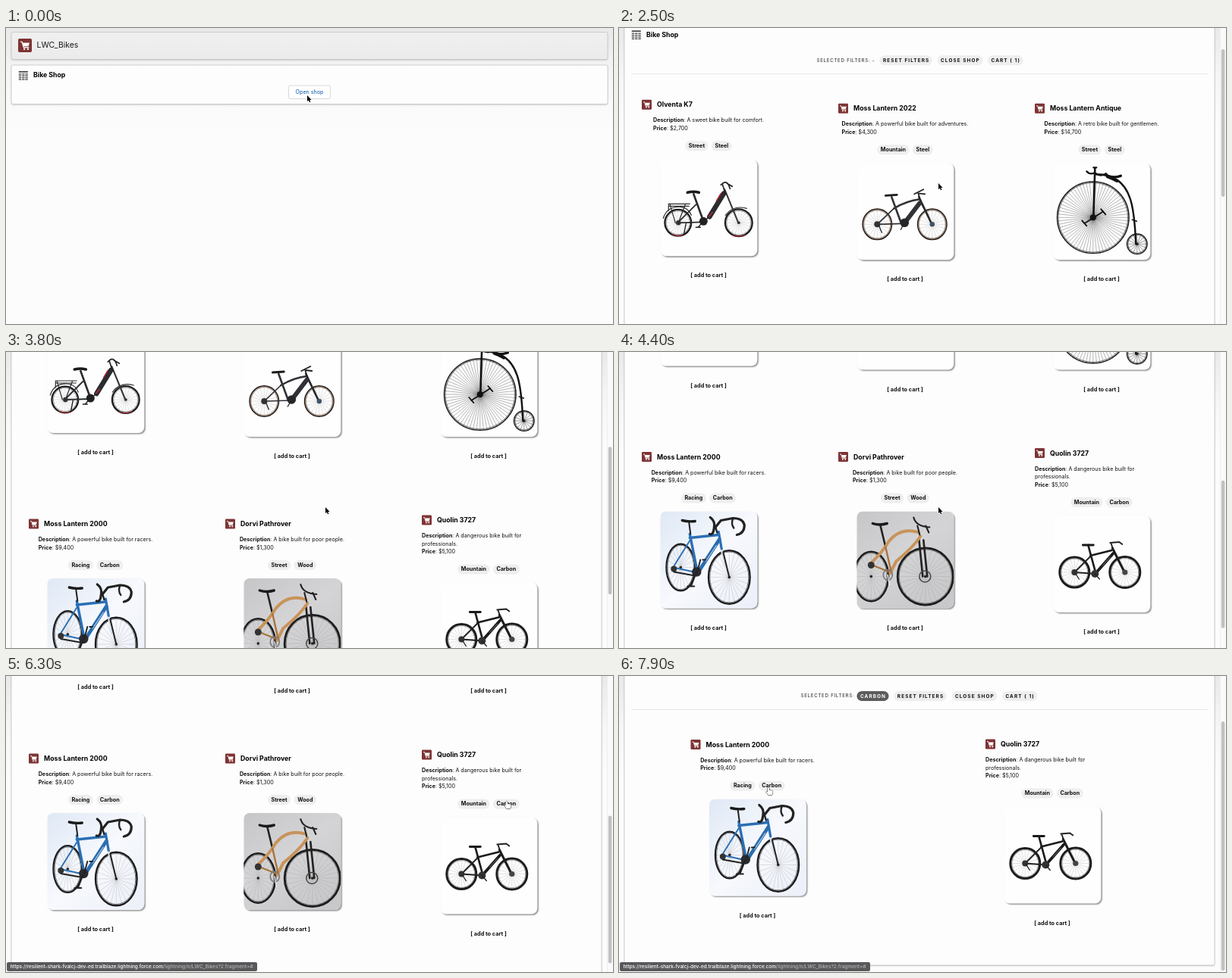
These frames come from a looping animation (800x391 px, 8000 ms). An HTML page with a canvas:

```html
<!DOCTYPE html>
<html lang="en">
<head>
<meta charset="utf-8">
<title>Bike Shop</title>
<style>
  html, body { margin: 0; width: 100%; height: 100%; overflow: hidden; background: #fcfcfc; }
  canvas { position: fixed; left: 0; top: 0; width: 800px; height: 391px; display: block; }
</style>
</head>
<body>
<canvas id="stage"></canvas>
<script>
const W = 800, H = 391, LOOP = 8000, STEP = 100;
const OPEN = 900, FILTER = 6600;
const FONT = 'Inter, "Liberation Sans", sans-serif';
const BODY = 7.15;
const dpr = window.devicePixelRatio || 1;
const canvas = document.getElementById('stage');
canvas.width = W * dpr;
canvas.height = H * dpr;
const c = canvas.getContext('2d');

// ---------- drawing helpers ----------
function text(str, x, y, size, { weight = 400, color = '#111', align = 'left', gap = 0 } = {}) {
  c.font = `${weight} ${size}px ${FONT}`;
  c.letterSpacing = gap + 'px';
  c.fillStyle = color;
  c.textAlign = align;
  c.textBaseline = 'middle';
  c.fillText(str, x, y);
  return c.measureText(str).width;
}

function measure(str, size, weight = 400, gap = 0) {
  c.font = `${weight} ${size}px ${FONT}`;
  c.letterSpacing = gap + 'px';
  return c.measureText(str).width;
}

function round(x, y, w, h, r, fill) {
  c.beginPath();
  c.roundRect(x, y, w, h, r);
  if (fill) {
    c.fillStyle = fill;
    c.fill();
  }
}

function shadow(color, blur, dx, dy) {
  c.shadowColor = color;
  c.shadowBlur = blur * dpr;
  c.shadowOffsetX = dx * dpr;
  c.shadowOffsetY = dy * dpr;
}

function panel(x, y, w, h, fill) {
  c.save();
  shadow('rgba(0,0,0,.22)', 2, 0, 1);
  round(x, y, w, h, 2.5, fill);
  c.restore();
  round(x, y, w, h, 2.5);
  c.strokeStyle = '#c6c6c6';
  c.lineWidth = 0.8;
  c.stroke();
}

function gradient(x0, y0, x1, y1, ...colors) {
  const g = c.createLinearGradient(x0, y0, x1, y1);
  colors.forEach((col, i) => g.addColorStop(i / (colors.length - 1), col));
  return g;
}

function line(color, width, d) {
  c.strokeStyle = color;
  c.lineWidth = width;
  c.lineCap = c.lineJoin = 'round';
  c.stroke(new Path2D(d));
}

function ring(x, y, rx, ry, color, width) {
  c.beginPath();
  c.ellipse(x, y, rx, ry, 0, 0, Math.PI * 2);
  c.strokeStyle = color;
  c.lineWidth = width;
  c.stroke();
}

function disc(x, y, r, color) {
  c.beginPath();
  c.arc(x, y, r, 0, Math.PI * 2);
  c.fillStyle = color;
  c.fill();
}

function wheel(x, y, rx, ry, { tyre = 2, spokes = 20, spoke = '#999', thin = 0.3, rim = '#777' } = {}) {
  c.beginPath();
  for (let i = 0; i < spokes; i++) {
    const a = i / spokes * Math.PI * 2;
    c.moveTo(x, y);
    c.lineTo(x + rx * Math.cos(a), y + ry * Math.sin(a));
  }
  c.strokeStyle = spoke;
  c.lineWidth = thin;
  c.stroke();
  ring(x, y, rx - tyre - 0.6, ry - tyre - 0.6, rim, 0.7);
  ring(x, y, rx - tyre / 2, ry - tyre / 2, '#1c1c1e', tyre);
  disc(x, y, 1.8, '#222');
}

function cartIcon(x, y, size) {
  round(x, y, size, size, size * 0.1, '#7e3434');
  c.save();
  c.translate(x, y);
  c.scale(size / 13, size / 13);
  line('#fff', 0.9, 'M2.4 3.1H3.7L5.2 8.4H10');
  c.fillStyle = '#fff';
  c.fill(new Path2D('M4.3 3.9H10.8L9.8 7.4H5.2Z'));
  disc(5.9, 9.9, 0.85, '#fff');
  disc(9.3, 9.9, 0.85, '#fff');
  c.restore();
}

function tableIcon(x, y) {
  c.fillStyle = '#444';
  c.fillRect(x, y, 12, 1.7);
  for (let r = 0; r < 4; r++)
    for (let k = 0; k < 3; k++) c.fillRect(x + k * 4.3, y + 3.2 + r * 2.4, 3.4, 1.3);
}

// ---------- bike pictures, each in a 128 px square ----------
function cityBike() {
  wheel(23.5, 84, 18.5, 18.5, { tyre: 2.3 });
  wheel(103.5, 84, 19, 19, { tyre: 2.3 });
  line('#c22a35', 1, 'M15 99Q23 104 32 99M95 100Q103 104 112 100');
  line('#2c2c2e', 1.2, 'M4 78Q9 62 27 63Q37 64 41 74M86 74Q96 60 114 65');
  line('#2c2c2e', 1.2, 'M11 59H39M12 62H38M13 60L20 84M33 60L24 84M11 59V68');
  line('#2b2c30', 1.8, 'M23 84L57 83M47 60L23 84');
  line('#2b2c30', 2.6, 'M44 46L57 82');
  line('#34353a', 2, 'M85 40L103 84');
  line('#2b2c30', 6.5, 'M84 45L65 76');
  line('#c22a35', 1.4, 'M80 45L74 55M69 70L64 76');
  line('#222', 1.7, 'M86 46L82 33M80 34Q88 25 92 39M88 32L95 36');
  line('#1a1a1a', 3.6, 'M36 44Q44 42 51 44');
  disc(57, 82, 5.5, '#222');
  disc(24, 84, 3.2, '#333');
  line('#222', 1.4, 'M57 82L50 90M47 90H53M57 82L64 77M34 85L31 100');
}

function trailBike() {
  wheel(27, 81, 20, 21);
  wheel(99.5, 81, 20, 21);
  ring(27, 81, 18.3, 19.3, '#a97b5c', 0.9);
  ring(99.5, 81, 18.3, 19.3, '#a97b5c', 0.9);
  line('#303236', 1.7, 'M27 81L60 80M49 60L27 81');
  line('#303236', 2.6, 'M46 45L58 78M49 60Q66 50 83 48');
  line('#26272a', 2.6, 'M82 45L99 81M85 52L94 70');
  line('#303236', 6, 'M83 53L64 78');
  line('#222', 1.8, 'M84 50L81 40M76 41L88 35M81 40L90 41');
  line('#1a1a1a', 2.8, 'M38 43L53 42');
  disc(63, 79, 5.8, '#26272a');
  disc(99.5, 81, 3.2, '#3d536c');
  disc(27, 81, 4, '#333');
  line('#222', 1.3, 'M62 81L58 88M29 82L33 92');
}

function pennyFarthing() {
  wheel(52.5, 72, 48, 48, { tyre: 1.5, spokes: 64, spoke: '#444', thin: 0.4, rim: '#333' });
  wheel(110.5, 107, 14, 14, { tyre: 1.4, spokes: 16, spoke: '#333', thin: 0.5, rim: '#333' });
  line('#111', 2.4, 'M55 15Q90 14 101 46Q107 62 109 107');
  line('#111', 2.6, 'M55 7L53 72');
  line('#111', 2.2, 'M44 11Q48 16 55 13Q62 19 70 14M53 6H57');
  line('#111', 3.4, 'M69 15Q77 21 89 17M71 18Q79 21 84 24');
  line('#111', 1.9, 'M41 80L66 64M38 76L44 83M63 61L69 68');
  line('#111', 1.6, 'M104 75L110 77');
  disc(52.5, 72, 4, '#111');
}

function roadBike() {
  c.fillStyle = gradient(0, 0, 128, 128, '#dfe8f5', '#f7f9fd', '#ebeff8');
  c.fillRect(0, 0, 129, 129);
  wheel(27, 74, 20, 32, { tyre: 2.2, rim: '#444' });
  wheel(91, 87, 28.5, 36.5, { tyre: 2.4, spokes: 24, rim: '#444' });
  line('#2a6fb5', 1.9, 'M40 37L17 74L49 81');
  line('#2a6fb5', 3.4, 'M39 30L49 80M39 35L77 31');
  line('#2a6db0', 4.8, 'M78 37L51 79');
  line('#dfe9f4', 1, 'M74 45L60 66');
  line('#2a6fb5', 3.2, 'M77 27L81 50');
  line('#d5dfea', 3, 'M81 52L86 72');
  line('#222', 2, 'M83 54L91 87M38 15L40 30');
  line('#1a1a1a', 3.4, 'M29 12Q37 14 46 13');
  line('#222', 3.2, 'M66 8Q73 13 71 22Q70 32 65 30M72 22L80 12L96 9Q109 9 111 18Q111 29 101 31');
  line('#222', 2.4, 'M96 9Q93 17 97 22M75 28L73 21');
  disc(18, 76, 4, '#333');
  disc(48, 80, 6.2, '#292b30');
  line('#222', 1.9, 'M48 80L41 98M36 99H45M49 79L53 64M56 64H60M18 80L46 85');
}

function woodBike() {
  c.fillStyle = gradient(0, 0, 90, 128, '#c6c6c8', '#d4d4d6', '#c8c8ca');
  c.fillRect(0, 0, 129, 129);
  wheel(19, 86, 24, 34, { tyre: 2.6, rim: '#555' });
  wheel(90.5, 86, 38, 39, { tyre: 2.8, spokes: 28, rim: '#555' });
  line('#222', 2.6, 'M31 18L38 47M82 36L87 86M88 38L93 86');
  line('#c8935a', 3.8, 'M82 28Q58 20 42 40Q34 54 18 69');
  line('#c8935a', 4, 'M84 33Q74 48 52 66L44 82');
  line('#a8743f', 2.4, 'M18 70L43 80M38 47L45 78');
  line('#1a1a1a', 3.4, 'M21 16Q30 19 40 16');
  line('#222', 2.1, 'M83 31L80 19M75 8Q78 20 96 21M91 19L95 28');
  ring(90, 86, 7.5, 7.5, '#444', 1.5);
  ring(41, 84, 6, 7, '#77777a', 1.6);
  disc(19, 71, 4.5, '#333');
  line('#eee', 1.4, 'M41 84L43 97');
}

function hardtail() {
  wheel(28, 75, 21, 21.5, { tyre: 3 });
  wheel(94.5, 75, 21.5, 22, { tyre: 3 });
  line('#222', 1.9, 'M28 75L55 77M49 54L28 75');
  line('#1c1c1e', 2.7, 'M46 39L56 76M49 53L77 46');
  line('#1c1c1e', 3.8, 'M79 50L57 75');
  line('#aaa', 0.6, 'M75 55L65 66');
  line('#1c1c1e', 3, 'M78 43L94 75');
  line('#222', 1.9, 'M79 45L76 36M75 36L87 35L91 38');
  line('#1a1a1a', 2.8, 'M39 39L53 39');
  disc(55, 77, 5, '#333');
  disc(28, 75, 4, '#333');
  disc(94.5, 75, 3.6, '#444');
  line('#222', 1.4, 'M55 77L61 84M29 76L34 84');
}

const bikes = [
  ['Olventa K7', ['A sweet bike built for comfort.'], '$2,700', ['Street', 'Steel'], cityBike],
  ['Moss Lantern 2022', ['A powerful bike built for adventures.'], '$4,300', ['Mountain', 'Steel'], trailBike],
  ['Moss Lantern Antique', ['A retro bike built for gentlemen.'], '$14,700', ['Street', 'Steel'], pennyFarthing],
  ['Moss Lantern 2000', ['A powerful bike built for racers.'], '$9,400', ['Racing', 'Carbon'], roadBike],
  ['Dorvi Pathrover', ['A bike built for poor people.'], '$1,300', ['Street', 'Wood'], woodBike],
  ['Quolin 3727', ['A dangerous bike built for', 'professionals.'], '$5,100', ['Mountain', 'Carbon'], hardtail]
];

// Places: bike index, left edge, title height
const allPlaces = [[0, 30, 155], [1, 289, 160], [2, 548, 160], [3, 30, 475], [4, 289, 475], [5, 548, 470]];
const carbonPlaces = [[3, 94.5, 160.5], [5, 483, 160]];

function labelled(label, value, x, y) {
  const w = text(label, x, y, BODY, { weight: 700 });
  text(': ' + value, x + w, y, BODY);
}

function bikeCard([index, x, y]) {
  const [name, desc, price, tags, draw] = bikes[index];
  const mid = x + 88;
  cartIcon(x, y - 6.5, 13);
  text(name, x + 20, y + 0.5, 8.75, { weight: 700, color: '#000' });

  const descWidth = measure('Description', BODY, 700) + measure(': ' + desc[0], BODY);
  const left = desc.length > 1 ? x : mid - descWidth / 2;
  labelled('Description', desc[0], left, y + 21);
  if (desc.length > 1) {
    y += 10.5;
    text(desc[1], left, y + 21, BODY);
  }
  labelled('Price', price, left, y + 31.5);

  const widths = tags.map(tag => measure(tag, BODY, 700) + 9);
  let tx = mid - (widths[0] + widths[1] + 4.5) / 2;
  tags.forEach((tag, i) => {
    round(tx, y + 48, widths[i], 13, 6.5, '#eeeeee');
    text(tag, tx + 4.5, y + 54.7, BODY, { weight: 700 });
    tx += widths[i] + 4.5;
  });

  c.save();
  c.translate(x + 24.3, y + 72);
  c.save();
  shadow('rgba(0,0,0,.4)', 1.5, 1.6, 1.6);
  round(0, 0, 128, 128, 8, '#fefefe');
  c.restore();
  round(0, 0, 128, 128, 8);
  c.clip();
  draw();
  c.restore();

  text('[ add to cart ]', mid, y + 226, 7.3, { weight: 700, align: 'center' });
}

function filterBar(filtered) {
  const y = 96.5, size = 6.4, gap = 1.1;
  let x = filtered ? 239.5 : 260.5;
  x += text('SELECTED FILTERS:' + (filtered ? '' : ' -'), x, y, 6.2, { gap: 0.7, color: '#222' });
  x += filtered ? 3 : 6;
  const labels = ['RESET FILTERS', 'CLOSE SHOP', 'CART ( 1)'];
  if (filtered) labels.unshift('CARBON');
  labels.forEach((label, i) => {
    const dark = filtered && i === 0;
    const w = measure(label, size, 700, gap) + 8;
    round(x, y - 6.5, w, 13, 6.5, dark ? '#5c5c5c' : '#eeeeee');
    text(label, x + 4.5, y + 0.2, size, { weight: 700, gap, color: dark ? '#fff' : '#111' });
    x += w + 6.8;
  });
  c.fillStyle = '#e4e2e6';
  c.fillRect(16, 114, 760, 0.8);
}

function openButton(hover) {
  round(372.5, 76, 55, 17.5, 2.3, hover ? '#f3f3f3' : '#fff');
  c.strokeStyle = '#c9c9c9';
  c.lineWidth = 0.7;
  c.stroke();
  text('Open shop', 400, 85, BODY, { color: hover ? '#014486' : '#0b5cab', align: 'center' });
}

function scrollbar(top, page) {
  c.fillStyle = '#fafafa';
  c.fillRect(792, 0, 8, H);
  c.fillStyle = '#e8e8e8';
  c.fillRect(792, 0, 0.6, H);
  const k = H / page;
  round(793.8, top * k + 1, 4.6, H * k - 1, 2.3, '#c1c1c1');
}

function statusBar() {
  round(1, 378, 330, 12, 2, '#58585b');
  const host = 'https://resilient-shark-fvalcj-dev-ed.trailblaze.lightning.force.com';
  const w = text(host, 5.5, 384.2, 6.4, { weight: 500, color: '#fff' });
  text('/lightning/n/LWC_Bikes?2.fragment=#', 5.5 + w, 384.2, 6.5, { weight: 500, color: '#b4b4b6' });
}

function cursor(x, y, hand) {
  c.save();
  c.translate(x, y);
  c.lineJoin = 'round';
  c.lineWidth = hand ? 0.9 : 1.2;
  const d = hand
    ? 'M-1 .8Q0-.6 1 .8V4Q2 3.2 2.7 4.2Q3.8 3.6 4.3 4.7Q5.8 4.3 5.7 6Q5.8 8.5 4.5 10.3H-.3Q-1.8 8-3.2 6.3Q-3 4.8-1 6.2Z'
    : 'M0 0V8L1.8 6.4L3.1 9.2L4.4 8.6L3.2 5.9H5.6Z';
  const path = new Path2D(d);
  c.strokeStyle = hand ? '#111' : '#fff';
  c.fillStyle = hand ? '#fff' : '#000';
  c.stroke(path);
  c.fill(path);
  c.restore();
}

// ---------- motion ----------
const scrollKeys = [[2200, 0], [3200, 179], [3800, 248], [4600, 366]];
const cursorKeys = [
  [1000, 397, 89], [1800, 414, 163], [1900, 414, 163], [2300, 421, 205], [5400, 421, 205],
  [5700, 520, 130], [5900, 605, 103], [6100, 664, 155], [6200, 660, 165], [6600, 660, 165],
  [6900, 620, 118], [7100, 586, 95], [7500, 390, 105], [7800, 205, 145], [7900, 197, 147]
];

function track(keys, t) {
  if (t <= keys[0][0]) return keys[0].slice(1);
  for (let i = 1; i < keys.length; i++) {
    const a = keys[i - 1], b = keys[i];
    if (t <= b[0]) {
      const k = (t - a[0]) / (b[0] - a[0]);
      return a.slice(1).map((v, j) => v + (b[j + 1] - v) * k);
    }
  }
  return keys[keys.length - 1].slice(1);
}

function render(t) {
  const open = t >= OPEN, filtered = t >= FILTER;
  const top = filtered ? 70 : track(scrollKeys, t)[0];
  const page = filtered ? 463 : 780;
  const width = open ? 778 : 786;

  c.setTransform(dpr, 0, 0, dpr, 0, 0);
  c.fillStyle = '#fcfcfc';
  c.fillRect(0, 0, W, H);
  c.fillStyle = gradient(0, 0, 0, 130, '#e9e9e9', '#f6f6f6', '#fcfcfc');
  c.fillRect(0, 0, W, 130);

  c.save();
  c.translate(0, -top);
  panel(7, 5.5, width, 36, gradient(0, 5, 0, 42, '#f0f0f0', '#ebebeb'));
  cartIcon(16, 14, 18);
  text('LWC_Bikes', 40.5, 23.3, 10.4, { color: '#181818' });
  panel(7, 49, width, open ? page - 60 : 51.5, '#fdfdfd');
  tableIcon(16.8, 57);
  text('Bike Shop', 36, 62.8, 8.75, { weight: 700, color: '#000' });
  if (open) {
    filterBar(filtered);
    (filtered ? carbonPlaces : allPlaces).forEach(bikeCard);
  } else {
    openButton(t >= 500);
  }
  c.restore();

  if (open) scrollbar(top, page);
  const onLink = (t >= 6100 && t < FILTER) || t >= 7800;
  if (onLink) statusBar();
  const [x, y] = track(cursorKeys, t);
  cursor(x, y, onLink || (t >= 500 && t < OPEN));
}

const start = performance.now();
function loop() {
  const t = (performance.now() - start) % LOOP;
  render(Math.floor(t / STEP) * STEP);
  requestAnimationFrame(loop);
}
loop();
</script>
</body>
</html>
```
